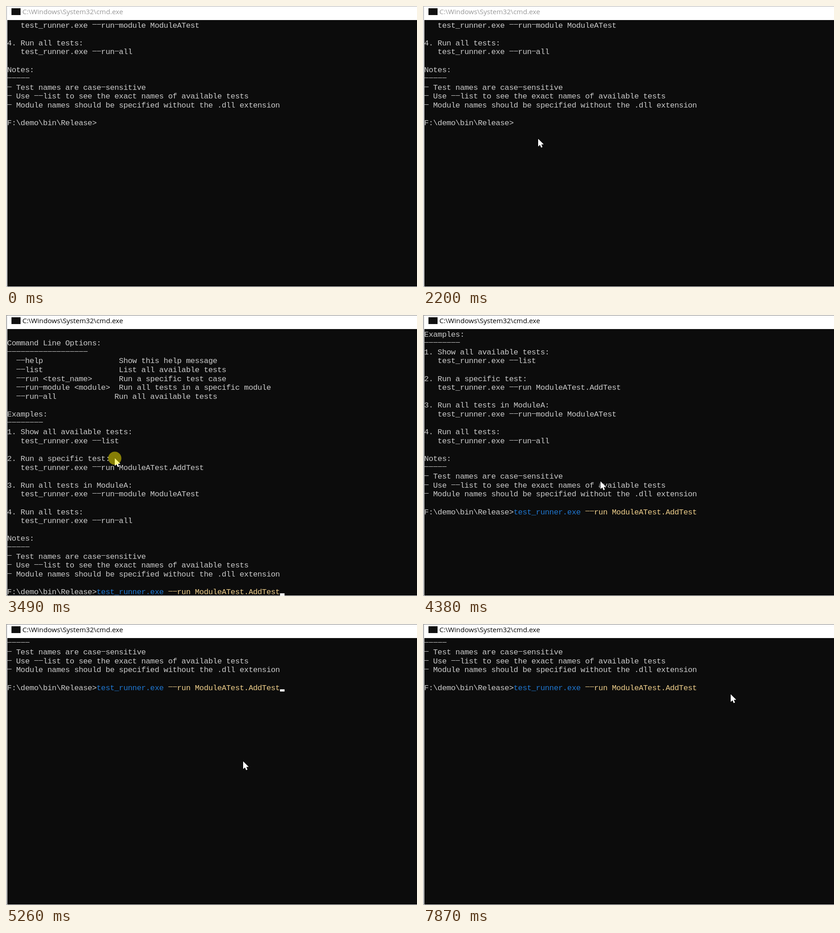
An HTML page with a canvas for the animation above (8000 ms loop, 903 by 620 pixels).

```html
<!DOCTYPE html>
<html lang="en">
<head>
<meta charset="utf-8">
<title>Terminal session</title>
<style>
html, body { margin: 0; width: 100%; height: 100%; overflow: hidden; background: #0c0c0c; }
canvas { display: block; }
</style>
</head>
<body>
<canvas id="stage" width="903" height="620"></canvas>
<script>
const ctx = document.getElementById('stage').getContext('2d');
const LOOP = 8000, TICK = 70;
const LEFT = 2.8, TOP = 31, CELL = 9.82, ROW = 19.6;
const GREY = '#cccccc', BLUE = '#1f78d2', SAND = '#f0d08c';

const help = `
Command Line Options:
------------------
  --help                 Show this help message
  --list                 List all available tests
  --run <test_name>      Run a specific test case
  --run-module <module>  Run all tests in a specific module
  --run-all             Run all available tests

Examples:
--------
1. Show all available tests:
   test_runner.exe --list

2. Run a specific test:
   test_runner.exe --run ModuleATest.AddTest

3. Run all tests in ModuleA:
   test_runner.exe --run-module ModuleATest

4. Run all tests:
   test_runner.exe --run-all

Notes:
-----
- Test names are case-sensitive
- Use --list to see the exact names of available tests
- Module names should be specified without the .dll extension
`.split('\n');
const promptRow = help.length;
const prompt = 'F:\\demo\\bin\\Release>';
const program = 'test_runner.exe', args = ' --run ModuleATest.AddTest';

// Pointer path: time, x, y
const path = [
  [390, 548, 624], [460, 546, 606], [800, 430, 440], [1230, 280, 286],
  [1300, 290, 262], [1650, 325, 151], [2070, 256, 285], [2140, 256, 285],
  [2200, 239, 333], [2340, 239, 333], [2420, 239, 316], [3950, 239, 316],
  [4310, 388, 362], [4380, 390, 367], [4520, 390, 372], [4720, 390, 373],
  [5110, 390, 373], [5470, 705, 205], [5670, 676, 155]
];
// View position: time, first visible line
const scroll = [[0, 18], [3490, 0], [4310, 9], [4450, 18], [4850, 24]];
const caretOn = [[2490, 3090], [3490, 4020], [4450, 5820], [6280, 6810], [7340, 7870]];
const clicks = [[2490, 2630], [3490, 3630], [5820, 5950]];
const ACTIVE = 2490, PASTE = 3490, SELECT = [5820, 7670];

const within = (t, [a, b]) => t >= a && t < b;
const inAny = (t, spans) => spans.some(s => within(t, s));

function rect(x, y, w, h, color) {
  ctx.fillStyle = color;
  ctx.fillRect(x, y, w, h);
}

function write(str, col, row, color) {
  const y = TOP + row * ROW;
  ctx.font = '17px "Liberation Mono", monospace';
  ctx.textAlign = 'center';
  ctx.fillStyle = color;
  [...str].forEach((ch, i) => {
    const x = LEFT + (col + i) * CELL;
    if (ch === '-') ctx.fillRect(x + 0.4, Math.round(y + 9.4), 9.2, 1);
    else if (ch !== ' ') ctx.fillText(ch, x + CELL / 2, Math.round(y + 16.6));
  });
}

function pointerAt(t) {
  if (t < 460) return null;
  const last = path[path.length - 1];
  if (t >= last[0]) return [last[1], last[2]];
  const i = path.findIndex(p => p[0] > t);
  const [t0, x0, y0] = path[i - 1], [t1, x1, y1] = path[i];
  const k = (t - t0) / (t1 - t0);
  return [Math.round(x0 + (x1 - x0) * k), Math.round(y0 + (y1 - y0) * k)];
}

function drawPointer([x, y]) {
  const shape = [[0, 0], [0, 17], [4, 13.4], [6.6, 19.6], [9.6, 18.3], [7, 12.4], [12.3, 12.2]];
  ctx.beginPath();
  shape.forEach(([dx, dy]) => ctx.lineTo(x + dx, y + dy));
  ctx.closePath();
  ctx.strokeStyle = '#000';
  ctx.lineWidth = 1.6;
  ctx.stroke();
  ctx.fillStyle = '#fff';
  ctx.fill();
}

function drawFrame(t) {
  const active = t >= ACTIVE;
  const edge = active ? '#777777' : '#aaaaaa';
  rect(0, 0, 903, 620, '#ffffff');
  rect(0, 0, 1, 620, '#e6e6e6');
  rect(1, 0, 1, 620, edge);
  rect(1, 0, 902, 1, edge);
  rect(12, 5, 20, 15, '#101010');
  ctx.font = '15.1px "Open Sans", "Noto Sans CJK SC", "Noto Sans CJK", sans-serif';
  ctx.textAlign = 'left';
  ctx.fillStyle = active ? '#000000' : '#999999';
  ctx.fillText((within(t, SELECT) ? '选择 ' : '') + 'C:\\Windows\\System32\\cmd.exe', 36, 18);
  rect(3, TOP, 900, 588, '#0c0c0c');
}

function drawConsole(t) {
  const first = scroll.filter(s => s[0] <= t).pop()[1];
  const row = promptRow - first;
  help.slice(first).forEach((line, i) => write(line, 0, i, GREY));
  write(prompt, 0, row, GREY);
  let col = prompt.length;
  if (t >= PASTE) {
    write(program, col, row, BLUE);
    col += program.length;
    write(args, col, row, SAND);
    col += args.length;
  }
  if (inAny(t, caretOn)) {
    rect(Math.round(LEFT + col * CELL), Math.round(TOP + (row + 1) * ROW) - 5, 10, 5, '#f2f2f2');
  }
  if (within(t, SELECT)) rect(671, 149, 10, 19, '#f2f2f2');
}

function render(t) {
  drawFrame(t);
  drawConsole(t);
  // Movement is sampled in short ticks, counted from each leg's start
  const leg = [460, 1300, 2150, 2350, 3960, 5120].filter(s => s <= t).pop();
  const step = leg === undefined ? t : leg + Math.floor((t - leg) / TICK) * TICK;
  const p = pointerAt(step);
  if (!p) return;
  drawPointer(p);
  if (inAny(t, clicks)) {
    ctx.beginPath();
    ctx.arc(p[0], p[1], 14.5, 0, Math.PI * 2);
    ctx.fillStyle = 'rgba(255, 240, 0, 0.5)';
    ctx.fill();
  }
}

const start = performance.now();
function loop() {
  render((performance.now() - start) % LOOP);
  requestAnimationFrame(loop);
}
loop();
</script>
</body>
</html>
```
